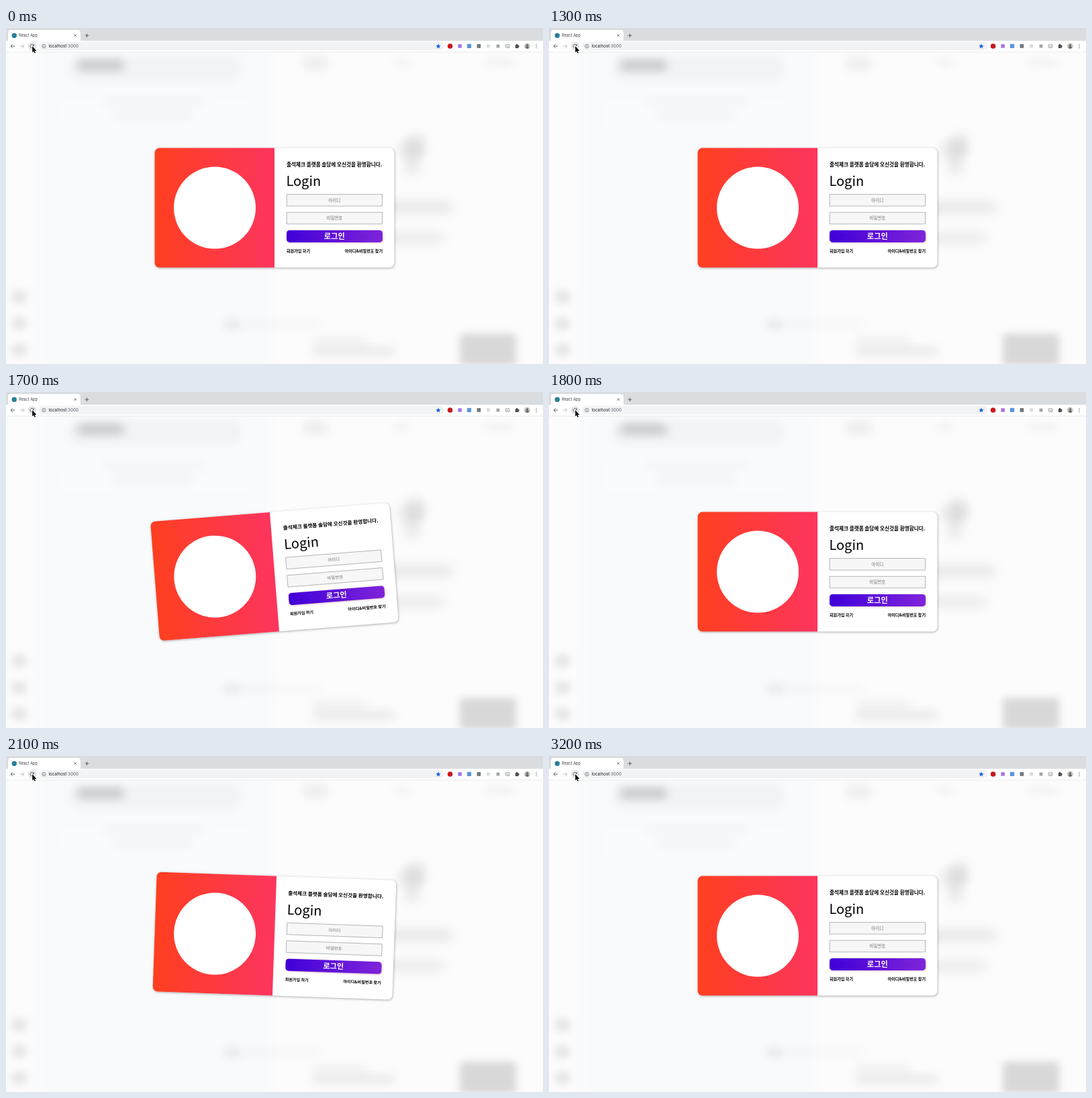
Recreate the animation shown at these times as an HTML page with a canvas. Size 800x500 px, loop 3.3 s.

```html
<!DOCTYPE html>
<html lang="ko">
<head>
<meta charset="utf-8">
<title>React App</title>
<style>
  html, body { margin: 0; width: 100%; height: 100%; overflow: hidden; background: #fcfcfc; }
  canvas { display: block; width: 800px; height: 500px; }
</style>
</head>
<body>
<canvas id="stage" width="800" height="500"></canvas>
<script>
const W = 800, H = 500, LOOP = 3300, STEP = 100;
const KR = '"Noto Sans CJK KR", "Noto Sans CJK", sans-serif';
const UI = 'Inter, Roboto, sans-serif';
const view = document.getElementById('stage').getContext('2d');

// Time in ms and card angle in degrees, eased between the keys
const SHAKE = [[1340, 0], [1675, -4.8], [1925, 4.8], [2240, 0]];

function angleAt(t) {
  for (let i = 1; i < SHAKE.length; i++) {
    const [t0, a0] = SHAKE[i - 1], [t1, a1] = SHAKE[i];
    if (t >= t0 && t < t1) {
      const x = (t - t0) / (t1 - t0);
      return a0 + (a1 - a0) * x * x * (3 - 2 * x);
    }
  }
  return 0;
}

function box(c, x, y, w, h, r, fill) {
  c.beginPath();
  c.roundRect(x, y, w, h, r);
  c.fillStyle = fill;
  c.fill();
}

function disc(c, x, y, r, fill) {
  c.beginPath();
  c.arc(x, y, r, 0, Math.PI * 2);
  c.fillStyle = fill;
  c.fill();
}

function path(c, pts, close) {
  c.beginPath();
  pts.forEach(([x, y], i) => i ? c.lineTo(x, y) : c.moveTo(x, y));
  if (close) c.closePath();
}

function line(c, color, width, ...pts) {
  path(c, pts);
  c.strokeStyle = color;
  c.lineWidth = width;
  c.stroke();
}

function label(c, text, x, y, font, color, align = 'left') {
  c.font = font;
  c.fillStyle = color;
  c.textAlign = align;
  c.fillText(text, x, y);
}

function shade(c, x0, x1, from, to) {
  const g = c.createLinearGradient(x0, 0, x1, 0);
  g.addColorStop(0, from);
  g.addColorStop(1, to);
  return g;
}

function blurred(c, blur, x, y, w, h, r, fill) {
  c.filter = `blur(${blur}px)`;
  box(c, x, y, w, h, r, fill);
  c.filter = 'none';
}

function drawPage(c) {
  c.fillStyle = '#fcfcfc';
  c.fillRect(0, 0, W, H);
  blurred(c, 5, 48, 20, 348, 500, 0, '#f8fafb');
  const dark = a => `rgba(0,0,0,${a})`;
  blurred(c, 6, 94, 41, 256, 38, 17, dark(.028));
  blurred(c, 7, 106, 48, 70, 15, 7, dark(.18));
  blurred(c, 6, 80, 103, 285, 50, 10, 'rgba(255,255,255,.3)');
  blurred(c, 6, 142, 104, 156, 14, 6, dark(.018));
  blurred(c, 6, 158, 122, 122, 18, 6, dark(.018));
  blurred(c, 7, 442, 43, 38, 20, 8, dark(.06));
  blurred(c, 6, 578, 46, 24, 11, 5, dark(.04));
  blurred(c, 6, 712, 46, 46, 11, 5, dark(.04));
  blurred(c, 7, 594, 157, 32, 36, 14, dark(.07));
  blurred(c, 7, 582, 168, 40, 28, 12, dark(.05));
  blurred(c, 7, 592, 192, 26, 28, 10, dark(.06));
  blurred(c, 8, 520, 258, 146, 18, 8, dark(.08));
  blurred(c, 8, 520, 304, 132, 17, 8, dark(.065));
  for (const y of [400, 440, 479]) blurred(c, 6, 8, y - 10, 24, 20, 10, dark(.09));
  blurred(c, 6, 324, 433, 24, 17, 8, dark(.06));
  blurred(c, 7, 345, 436, 125, 11, 5, dark(.025));
  blurred(c, 7, 456, 459, 82, 13, 6, dark(.045));
  blurred(c, 7, 456, 474, 124, 14, 6, dark(.07));
  blurred(c, 6, 676, 455, 84, 48, 4, dark(.14));
}

function drawIcons(c) {
  const gray = '#5f6368';
  line(c, gray, 1, [13, 27], [7.4, 27]);
  line(c, gray, 1, [9.8, 24.2], [7, 27], [9.8, 29.8]);
  line(c, '#bdc1c6', 1, [21, 27], [26.6, 27]);
  line(c, '#bdc1c6', 1, [24.2, 24.2], [27, 27], [24.2, 29.8]);

  disc(c, 39, 27, 6.3, '#e4e6e9');
  c.beginPath();
  c.arc(38.6, 27, 2.6, .5, 5.4);
  c.strokeStyle = gray;
  c.lineWidth = .9;
  c.stroke();
  path(c, [[41.8, 23.8], [41.8, 26.7], [38.9, 26.7]], true);
  c.fillStyle = gray;
  c.fill();

  c.beginPath();
  c.arc(56.4, 27, 2.7, 0, Math.PI * 2);
  c.lineWidth = .7;
  c.stroke();
  line(c, gray, .8, [56.4, 26.6], [56.4, 28.5]);
  line(c, gray, .8, [56.4, 25.2], [56.4, 25.9]);

  const star = [];
  for (let i = 0; i < 10; i++) {
    const a = i * Math.PI / 5 - Math.PI / 2, r = i % 2 ? 1.7 : 3.9;
    star.push([644 + r * Math.cos(a), 27.2 + r * Math.sin(a)]);
  }
  path(c, star, true);
  c.fillStyle = '#1f62e0';
  c.fill();

  disc(c, 661.6, 27, 3.8, '#c9181f');
  box(c, 673.4, 24.2, 5.4, 5.4, 0, '#a070e4');
  box(c, 686.9, 23.8, 6.2, 6.2, 0, '#5c92e6');
  box(c, 701.6, 24, 5.6, 5.8, 0, '#74767a');
  box(c, 716, 24.2, 5.2, 5.2, 0, '#dcdddf');
  box(c, 730.6, 24.6, 4.8, 4.8, 0, '#a0a2a5');
  c.strokeStyle = '#85888b';
  c.lineWidth = .8;
  c.strokeRect(744.6, 24.9, 5.2, 4.3);
  line(c, '#85888b', .8, [746, 27.5], [748.4, 27.5]);

  box(c, 758.8, 25, 4.8, 4.9, .5, '#4c5054');
  disc(c, 761, 24.8, 1.1, '#4c5054');
  disc(c, 763.7, 27.4, 1.1, '#4c5054');

  disc(c, 776.3, 27, 4.4, '#c3c1bd');
  disc(c, 776.5, 25.8, 1.6, '#646260');
  box(c, 774.2, 27.5, 4.6, 3, 1.4, '#646260');
  for (const y of [24.6, 27, 29.4]) disc(c, 790, y, .7, gray);
}

function drawChrome(c) {
  box(c, 0, 0, W, 36, 0, '#fff');
  box(c, 0, 0, W, 19, 0, '#d9dde0');
  box(c, 3, 3, 108, 17, [4, 4, 0, 0], '#fff');
  box(c, 0, 35.4, W, .8, 0, '#e2e4e6');
  disc(c, 12.3, 11.2, 3.7, '#287f98');
  label(c, 'React App', 19.3, 13.2, `5.7px ${UI}`, '#3c4043');
  line(c, '#4c5054', .8, [101.6, 9.4], [105, 12.8]);
  line(c, '#4c5054', .8, [105, 9.4], [101.6, 12.8]);
  line(c, '#4c5054', .9, [117.7, 11.2], [123.3, 11.2]);
  line(c, '#4c5054', .9, [120.5, 8.4], [120.5, 14]);
  box(c, 49, 20.8, 604, 12.4, 6.2, '#f1f3f4');
  drawIcons(c);
  label(c, 'localhost', 63.4, 29.2, `6.3px ${UI}`, '#202124');
  const w = c.measureText('localhost').width;
  label(c, ':3000', 63.4 + w, 29.2, `6.3px ${UI}`, '#5f6368');

  path(c, [[39.2, 27], [39.2, 36.2], [41.2, 34.4], [42.6, 37.6], [44.1, 37],
           [42.7, 33.9], [45.4, 33.7]], true);
  c.strokeStyle = '#fff';
  c.lineWidth = 1.4;
  c.stroke();
  c.fillStyle = '#000';
  c.fill();
}

function field(c, y, hint) {
  box(c, 418, y, 143, 18, 0, '#f7f7f7');
  c.strokeStyle = '#b0b0b0';
  c.lineWidth = .9;
  c.strokeRect(418.2, y + .3, 142.4, 17.4);
  label(c, hint, 489.3, y + 11.4, `6.5px ${KR}`, '#757575', 'center');
}

function withShadow(c, color, blur, x, y, draw) {
  c.save();
  c.shadowColor = color;
  c.shadowBlur = blur;
  c.shadowOffsetX = x;
  c.shadowOffsetY = y;
  draw();
  c.restore();
}

function drawCard(c) {
  withShadow(c, 'rgba(0,0,0,.32)', 3.5, .6, .9, () =>
    box(c, 221.5, 179, 357, 178, 7, '#fff'));
  box(c, 221.5, 179, 178.5, 178, [7, 0, 0, 7], shade(c, 221.5, 400, '#ff3f20', '#fd355e'));
  disc(c, 311, 268, 61, '#fff');

  label(c, '출석체크 플랫폼 솔담에 오신것을 환영합니다.', 418, 206.6, `900 7.6px ${KR}`, '#000');
  label(c, 'Login', 417.4, 235.6, `500 20px ${KR}`, '#000');
  field(c, 247.7, '아이디');
  field(c, 274.4, '비밀번호');
  withShadow(c, 'rgba(150,30,90,.35)', 3, .6, .8, () =>
    box(c, 418, 301.3, 143, 18, 4.5, shade(c, 418, 561, '#4000d8', '#7f24da')));
  label(c, '로그인', 489.3, 314, `900 11.2px ${KR}`, '#fff', 'center');
  label(c, '회원가입 하기', 418, 334.5, `900 6.1px ${KR}`, '#000');
  label(c, '아이디&비밀번호 찾기', 561, 334.5, `900 6.1px ${KR}`, '#000', 'right');
}

const back = document.createElement('canvas');
back.width = W;
back.height = H;
const backCtx = back.getContext('2d');
drawPage(backCtx);
drawChrome(backCtx);

function render(t) {
  view.drawImage(back, 0, 0);
  view.save();
  view.translate(400, 267.6);
  view.rotate(angleAt(t) * Math.PI / 180);
  view.translate(-400, -268);
  drawCard(view);
  view.restore();
}

const start = performance.now();
function tick() {
  const t = (performance.now() - start) % LOOP;
  render(Math.floor(t / STEP) * STEP);
  requestAnimationFrame(tick);
}
tick();
</script>
</body>
</html>
```
